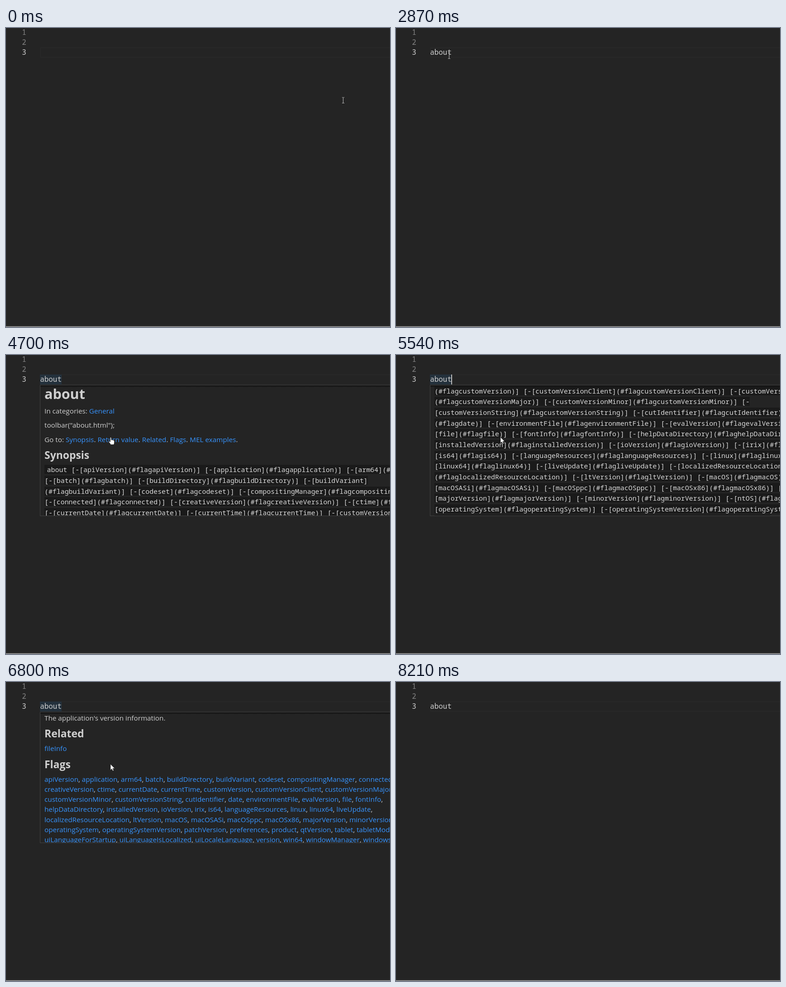
Recreate the animation shown at these times as an HTML page. Size 849 by 659 pixels, loop 8.28 s.

```html
<!DOCTYPE html>
<html lang="en">
<head>
<meta charset="utf-8">
<title>Editor completion and hover</title>
<style>
html, body { margin: 0; width: 100%; height: 100%; overflow: hidden; background: #242424; }
#stage { position: relative; width: 849px; height: 659px; overflow: hidden; background: #242424; color: #cfcfcf; }
#stage div, #stage svg { position: absolute; }
.mono { font: 15.88px/24px "Noto Sans Mono", "DejaVu Sans Mono", monospace; white-space: pre; }
.num { left: 35.3px; color: #858585; }
.num.on { color: #d0d0d0; }
#line { left: 76px; top: 43px; width: 800px; height: 20px; border: 1px solid #2b2b2b; }
#mark { left: 75px; top: 43px; width: 48px; height: 22px; background: #24313c; }
#typed { left: 75.3px; top: 41.3px; }
#caret { top: 43px; width: 2px; height: 22px; background: #bdbdbd; }
#foot { left: 0; top: 656px; width: 849px; height: 1px; background: #434343; box-shadow: 0 1px 0 #202020, 0 2px 0 #e0e0e0; }

#suggest { top: 66px; width: 499px; height: 266px; border: 1px solid #424242; border-top-color: #333; border-radius: 0 0 3px 3px; background: #252525; overflow: hidden; }
#suggest .item { left: 0; width: 499px; height: 22px; color: #bebebe; }
#suggest .item.on { background: #04395e; color: #fff; }
#suggest b { color: #2aaaff; }
#suggest .item span { position: absolute; left: 25.3px; top: -2px; }
#suggest .item i { position: absolute; left: 2px; top: -2px; font: 600 11px/24px "Open Sans", sans-serif; color: #cfcfcf; letter-spacing: -.1px; }
#thumb { right: 0; top: 0; width: 12px; background: rgba(121, 121, 121, .4); }

#hover { left: 75px; top: 66px; width: 900px; height: 289px; border: 1px solid #424242; box-sizing: border-box; background: #242424; overflow: hidden; }
#shade { left: 0; top: 0; width: 900px; height: 6px; background: linear-gradient(#0e0e0e, rgba(14, 14, 14, 0) 70%); }
/* the page uses stage coordinates */
#page { left: -76px; top: -67px; }
.row { left: 85px; white-space: pre; font: 15.28px/24px "Open Sans", "Noto Sans", sans-serif; }
.row a { color: #3794ff; }
.h1 { font-size: 30.5px; font-weight: 700; }
.h2 { font-size: 22.95px; font-weight: 700; }
.code { font: 500 14.9px/24px "Noto Sans Mono", "DejaVu Sans Mono", monospace; color: #dadada; }
.code span { background: #1a1a1a; }
.code.first span { padding-left: 5.6px; }
#mouse { left: 0; top: 0; overflow: visible; }
</style>
</head>
<body>
<div id="stage">
  <div id="line"></div>
  <div id="mark"></div>
  <div class="mono num" style="top:-2.7px">1</div>
  <div class="mono num" style="top:19.4px">2</div>
  <div class="mono num on" style="top:41.3px">3</div>
  <div id="typed" class="mono"></div>
  <div id="caret"></div>
  <div id="foot"></div>
  <div id="suggest"><div id="items"></div><div id="thumb"></div></div>
  <div id="hover"><div id="page"></div><div id="shade"></div></div>
  <svg id="mouse" width="20" height="20">
    <path id="beam" d="M-2-6H0M1-6H3M.5-5.5V6.5M-2 6.5H0M1 6.5H3" fill="none" stroke="#c4c4c4"/>
    <path id="arrow" d="M0 0V13.2L3 10.4L5 15L7.2 14L5.2 9.6H9.3Z" fill="#fff" stroke="#222" stroke-width=".7"/>
    <path id="hand" d="M-.6 1.2Q.3-.4 1.6 1.2V6.3Q3.2 5.2 4 6.5Q5.6 5.7 6.3 7.2Q8.2 6.6 8.5 8.6V12Q8.3 14.5 7.2 16.6H.6Q-.8 13.6-3.8 10.8Q-4 8.8-2 9.5L-.6 10.8Z" fill="#fff" stroke="#222" stroke-width=".7"/>
  </svg>
</div>
<script>
const LOOP = 8280, NOTCH = 58.45, CH = 9.53;
const $ = id => document.getElementById(id);
const show = (el, on) => el.style.visibility = on ? "visible" : "hidden";

// value of the last [time, value] step that has begun
const at = (track, t) => {
  let v = track[0][1];
  for (const [time, val] of track) if (time <= t) v = val;
  return v;
};

const lists = {
  a: "about abs addAttr addAttributeEditorNodeHelp addDynamic addNewShelfTab addPanelCategory addPP addPrefixToName advanceToNextDrivenKey affectedNet affects"
    .split(" ").map(w => w.replace("a", "*a*")),
  ab: "*ab*out *ab*s *a*rt*B*uildPaintMenu *a*ngle*B*etween *a*m*b*ientLight *a*ru*b*aNurbsToPoly ctx*Ab*ort *a*ssem*b*ly *a*ttri*b*ute *a*ttri*b*uteExists *a*ttri*b*uteInfo *a*ttri*b*uteMenu"
    .split(" ")
};
const itemsHtml = words => words.map((w, i) =>
  `<div class="item mono${i ? "" : " on"}" style="top:${(i * 22.1).toFixed(1)}px"><i>abc</i><span>${w.replace(/\*(\w+)\*/g, "<b>$1</b>")}</span></div>`).join("");

const flags = ("apiVersion application arm64 batch buildDirectory buildVariant codeset compositingManager connected " +
  "creativeVersion ctime currentDate currentTime customVersion customVersionClient customVersionMajor " +
  "customVersionMinor customVersionString cutIdentifier date environmentFile evalVersion file fontInfo " +
  "helpDataDirectory installedVersion ioVersion irix is64 languageResources linux linux64 liveUpdate " +
  "localizedResourceLocation ltVersion macOS macOSASi macOSppc macOSx86 majorVersion minorVersion ntOS " +
  "operatingSystem operatingSystemVersion patchVersion preferences product qtVersion tablet tabletMode uiLanguage " +
  "uiLanguageForStartup uiLanguageIsLocalized uiLocaleLanguage version win64 windowManager windows").split(" ");

let html = "";
const row = (y, text, cls = "") => html += `<div class="row ${cls}" style="top:${(y - 12.6).toFixed(2)}px">${text}</div>`;
const link = s => `<a>${s}</a>`;

// wraps the synopsis at 97 columns, breaking where a browser would
function synopsis() {
  const parts = ["about "];
  flags.forEach(f => parts.push("[-", `[${f}]`, `(#flag${f})] `));
  const lines = [""];
  for (const p of parts) {
    if ((lines[lines.length - 1] + p).trimEnd().length > 97) lines.push("");
    lines[lines.length - 1] += p;
  }
  return lines.map(s => s.trimEnd());
}

function buildPage() {
  row(86, "about", "h1");
  row(123.6, "In categories: " + link("General"));
  row(155, 'toolbar("about.html");');
  row(186.2, "Go to: " + ["Synopsis", "Return value", "Related", "Flags", "MEL examples"].map(link).join(". ") + ".");
  row(220.5, "Synopsis", "h2");
  synopsis().forEach((s, i) => row(253 + i * 23.65, `<span>${s}</span>`, i ? "code" : "code first"));
  row(806, "about is NOT undoable, NOT queryable, and NOT editable.");
  row(837.4, "This command displays version information about the application if it is executed without flags. If one of the");
  row(859.5, "above flags is specified then the corresponding value is returned.");
  row(892.5, "Return value", "h2");
  row(925.5, "string");

  const base = NOTCH * 15;
  row(base + 80, "The application's version information.");
  row(base + 113.5, "Related", "h2");
  row(base + 147.3, link("fileInfo"));
  row(base + 181.5, "Flags", "h2");
  const starts = ["apiVersion", "creativeVersion", "customVersionMinor", "helpDataDirectory",
    "localizedResourceLocation", "operatingSystem", "uiLanguageForStartup"].map(f => flags.indexOf(f));
  starts.forEach((s, i) => {
    const last = i === starts.length - 1;
    row(base + 215 + i * 22.1, flags.slice(s, starts[i + 1]).map(link).join(", ") + (last ? "" : ","));
  });

  let y = base + 381;
  const entries = {
    apiVersion: "Returns the api version.",
    application: "Returns the application name string.",
    arm64: "Returns true if the application is an arm64 build.",
    batch: "Returns true if application is in batch mode.",
    buildDirectory: "Returns the build directory string.",
    buildVariant: "Returns the build variant string.",
    codeset: "Returns a string identifying the codeset in use."
  };
  for (const f in entries) {
    row(y, `<b>-${f}</b>`);
    row(y + 31.2, entries[f]);
    y += 62.4;
  }
  $("page").innerHTML = html;
}

const typed = [[0, ""], [70, "a"], [1330, "ab"], [2030, "about"]];
const prefix = [[0, ""], [140, "a"], [1330, "ab"], [2030, ""]];
const blinks = [70, 560, 1120, 1890, 2030, 2590, 3080, 3640, 4070, 4630, 5190, 5680, 6170, 6730, 7290, 7790];
const caret = [[0, false], ...blinks.map((t, i) => [t, i % 2 === 0])];
const fade = [[0, 0], [3570, .4], [3640, .8], [3710, 1], [7930, 0]];
const scroll = [[0, 0], [4980, 1], [5050, 2], [5120, 3], [5190, 4], [5540, 5], [5610, 7], [5680, 8], [5820, 9],
  [5890, 10], [6170, 11], [6450, 12], [6730, 14], [6800, 15], [6940, 16], [7010, 17], [7080, 18],
  [7150, 19], [7220, 20], [7290, 21], [7500, 22]];

const ease = p => p * p * (3 - 2 * p);
const glide = (start, step, n, [x0, y0], [x1, y1]) => Array.from({ length: n }, (_, i) => {
  const k = ease((i + 1) / n);
  return [start + i * step, [x0 + (x1 - x0) * k, y0 + (y1 - y0) * k]];
});
const mouse = [[0, [745, 159]], [2590, [620, 141]], [2660, [330, 100]], [2730, [138, 71]],
  [2870, [117, 61]], [2940, [105, 55]], [3010, [97, 52]], [3080, [93, 51]], [3220, [86, 50]], [3290, [80, 49]],
  ...glide(4210, 70, 8, [80, 49], [231, 181]),
  ...glide(7650, 70, 8, [231, 181], [852, 592])];
const shape = [[0, "beam"], [4350, "arrow"], [4700, "hand"], [4980, "arrow"], [7860, "beam"], [8140, ""]];

let shown = "";
function render(t) {
  const text = at(typed, t), pre = at(prefix, t), alpha = at(fade, t);
  $("typed").textContent = text;
  $("caret").style.left = (text.length ? 74.8 + text.length * CH : 75) + "px";
  show($("caret"), at(caret, t));

  show($("suggest"), pre);
  if (pre && pre !== shown) {
    shown = pre;
    $("items").innerHTML = itemsHtml(lists[pre]);
    $("suggest").style.left = Math.floor(75.3 + pre.length * CH) + "px";
    $("thumb").style.height = (pre === "a" ? 20 : 111) + "px";
  }

  show($("mark"), alpha > 0);
  show($("hover"), alpha > 0);
  $("hover").style.opacity = alpha;
  $("page").style.transform = `translateY(${-Math.round(at(scroll, t) * NOTCH)}px)`;

  const [x, y] = at(mouse, t), kind = at(shape, t);
  $("mouse").style.transform = `translate(${Math.round(x)}px,${Math.round(y)}px)`;
  for (const k of ["beam", "arrow", "hand"]) show($(k), k === kind);
}

buildPage();
const t0 = performance.now();
function tick() {
  render((performance.now() - t0) % LOOP);
  requestAnimationFrame(tick);
}
tick();
</script>
</body>
</html>
```
